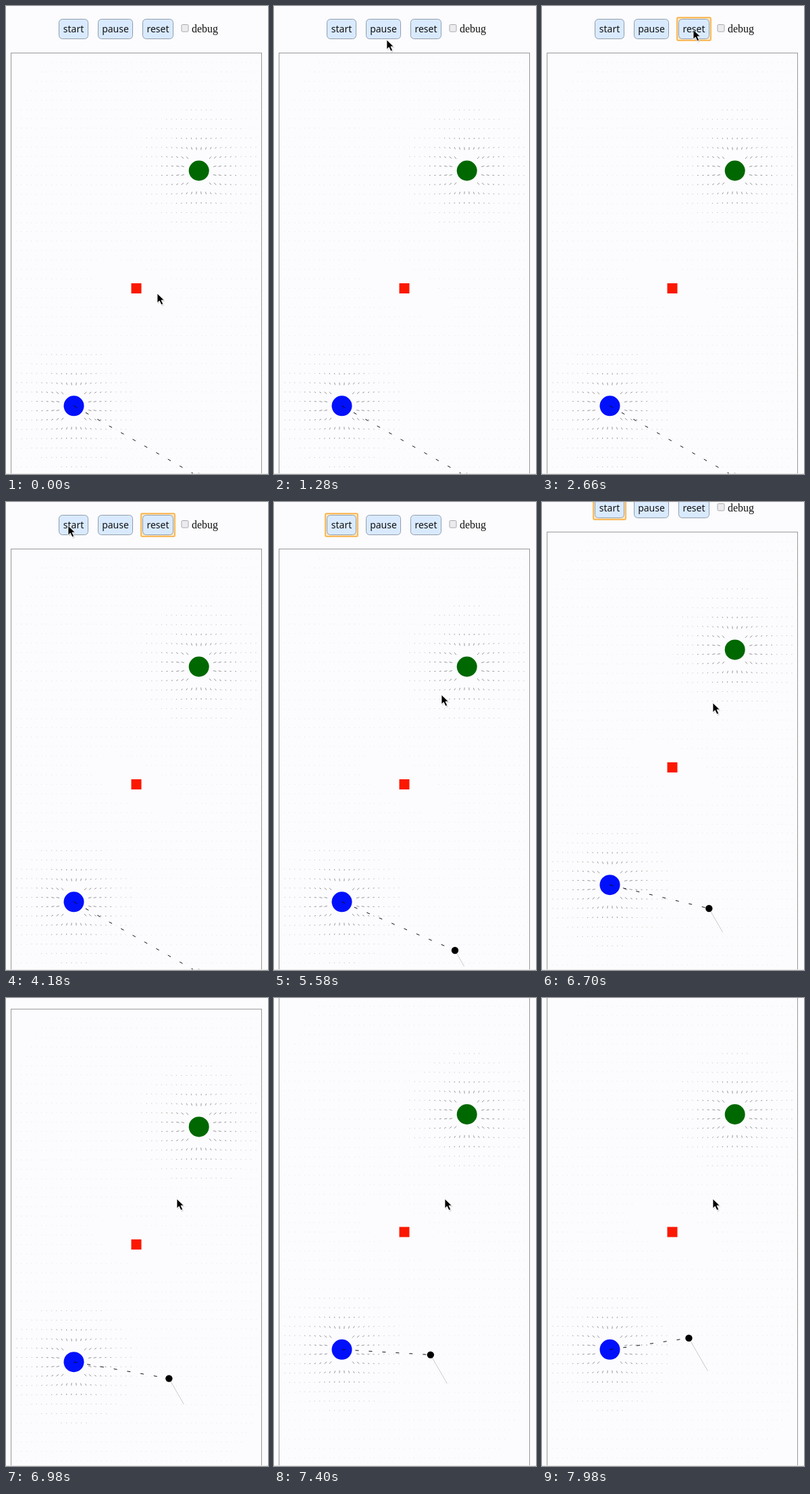
These frames come from a looping animation (388x692 px, 8000 ms). An HTML page:

```html
<!DOCTYPE html>
<html lang="en">
<head>
<meta charset="utf-8">
<title>Gravity field</title>
<style>
  html, body { margin: 0; width: 100%; height: 100%; overflow: hidden; background: #fcfcfe; }
  svg { display: block; width: 388px; height: 692px; }
  .button rect { fill: #d9eaff; stroke: #8f9dad; }
  .button text { font: 14px "Noto Sans", "Open Sans", sans-serif; text-anchor: middle; fill: #111; }
  .button .ring { fill: #ffe6bd; stroke: #f8b95c; stroke-width: 2; visibility: hidden; }
  .label { font: 16px "Liberation Serif", serif; fill: #111; }
  .field path { fill: none; stroke-width: 1; }
</style>
</head>
<body>
<svg viewBox="0 0 388 692">
  <g id="page">
    <g id="buttons"></g>
    <rect x="260" y="27.5" width="10" height="10.5" rx="1.5" fill="#ececef" stroke="#a9a9ae"/>
    <text class="label" x="275" y="39">debug</text>
    <rect x="7.5" y="69.5" width="371" height="697" fill="none" stroke="#98989c"/>
    <g class="field" id="field"></g>
    <circle cx="285.7" cy="243.5" r="15" fill="#006800"/>
    <circle cx="100.5" cy="591.3" r="15" fill="#0010fb"/>
    <rect x="185.5" y="410" width="15" height="15" fill="#fb1800"/>
    <line id="tether" x1="100.5" y1="591.3" stroke="#111" stroke-dasharray="5 15"/>
    <line id="trail" stroke="#c9c9ce"/>
    <circle id="ball" r="5.2" fill="#000"/>
  </g>
  <path d="M0 691.5H388" stroke="#e6e6e9"/>
  <g id="cursor">
    <path d="M1 2V16L4 13L7 19L10 18L8 12H12Z" fill="#d4d4d8" opacity=".8"/>
    <path d="M0 0V14L3.3 11L6 16.8L8.6 15.6L6 10H10.4Z" fill="#000" stroke="#fff" stroke-width=".8"/>
  </g>
</svg>
<script>
const LOOP = 8000, LAUNCH = 4280;
const BOX = { x: 8, y: 69.5, w: 370, h: 696 };
const MASSES = [[285.5, 243.5], [100.5, 591.5]];

// Keys are [time, value, value...]
const CURSOR = [
  [0, 224, 425], [240, 224, 425], [700, 202, 210], [1280, 167, 50], [1560, 150, 38],
  [1900, 158, 34], [2300, 205, 35], [2560, 224, 35], [3300, 224, 35],
  [3900, 100, 36], [4100, 92, 35], [4420, 92, 35], [4800, 150, 120],
  [5300, 238, 265], [5580, 248, 285], [6000, 253, 297], [8000, 253, 297]
];
const SCROLL = [
  [0, 0], [6420, 0], [6600, 25], [6700, 25], [6980, 53], [7120, 64], [7320, 71.5], [8000, 71.5]
];
const FOCUS = [[0, ""], [2660, "reset"], [4240, "start"]];

const el = id => document.getElementById(id);
const set = (node, attrs) => {
  for (const name in attrs) node.setAttribute(name, attrs[name]);
};

function sample(keys, t) {
  const i = Math.max(1, keys.findIndex(k => k[0] >= t));
  const a = keys[i - 1], b = keys[i];
  const u = (t - a[0]) / (b[0] - a[0]);
  return a.slice(1).map((v, j) => v + (b[j + 1] - v) * u);
}

function buildButtons() {
  el("buttons").innerHTML = [["start", 78, 44], ["pause", 136, 52], ["reset", 202, 46]]
    .map(([name, x, w]) => `<g class="button">
      <rect class="ring" id="ring-${name}" x="${x - 2}" y="17" width="${w + 4}" height="34" rx="2"/>
      <rect x="${x + .5}" y="19.5" width="${w - 1}" height="29" rx="5"/>
      <text x="${x + w / 2}" y="39">${name}</text></g>`).join("");
}

function buildField() {
  const inks = { "#e6e6ee": "", "#c3c3c9": "", "#96969b": "" };
  const [pale, mid, dark] = Object.keys(inks);
  for (let row = 1; row < 50; row++) {
    for (let col = 1; col < 50; col++) {
      const x = BOX.x + col * BOX.w / 50, y = BOX.y + row * BOX.h / 50;
      let fx = 0, fy = 0, nearest = Infinity;
      for (const [mx, my] of MASSES) {
        const dx = mx - x, dy = my - y, r = Math.hypot(dx, dy);
        fx += 5000 * dx / r ** 3;
        fy += 5000 * dy / r ** 3;
        nearest = Math.min(nearest, r);
      }
      const force = Math.hypot(fx, fy);
      if (nearest < 24 || force < .08) continue;
      if (force < .6) {
        inks[pale] += `M${Math.floor(x)} ${Math.floor(y) + .5}h1`;
        continue;
      }
      const k = Math.min(4.5, Math.max(1.2, force)) / force;
      inks[force > 1.3 ? dark : mid] +=
        `M${x.toFixed(1)} ${y.toFixed(1)}l${(fx * k).toFixed(1)} ${(fy * k).toFixed(1)}`;
    }
  }
  el("field").innerHTML = Object.entries(inks)
    .map(([color, d]) => `<path stroke="${color}" d="${d}"/>`).join("");
}

function draw(t) {
  const [scroll] = sample(SCROLL, t);
  const [cx, cy] = sample(CURSOR, t);
  set(el("page"), { transform: `translate(0 ${-scroll})` });
  set(el("cursor"), { transform: `translate(${cx} ${cy})` });

  const focus = FOCUS.filter(k => k[0] <= t).pop()[1];
  for (const name of ["start", "pause", "reset"])
    el("ring-" + name).style.visibility = name === focus ? "visible" : "hidden";

  const run = Math.max(0, t - LAUNCH);
  const x = 285.5 - run * (.0108 + 2.05e-6 * run);
  const y = 696 - run * (.02134 + 3.11e-6 * run);
  const tail = run ? 11.7 + .012 * run : 0;
  set(el("ball"), { cx: x, cy: y });
  set(el("tether"), { x2: x, y2: y });
  set(el("trail"), { x1: x, y1: y, x2: x + tail * .5, y2: y + tail * .866 });
}

buildButtons();
buildField();
const began = performance.now();
function tick() {
  draw((performance.now() - began) % LOOP);
  requestAnimationFrame(tick);
}
tick();
</script>
</body>
</html>
```
